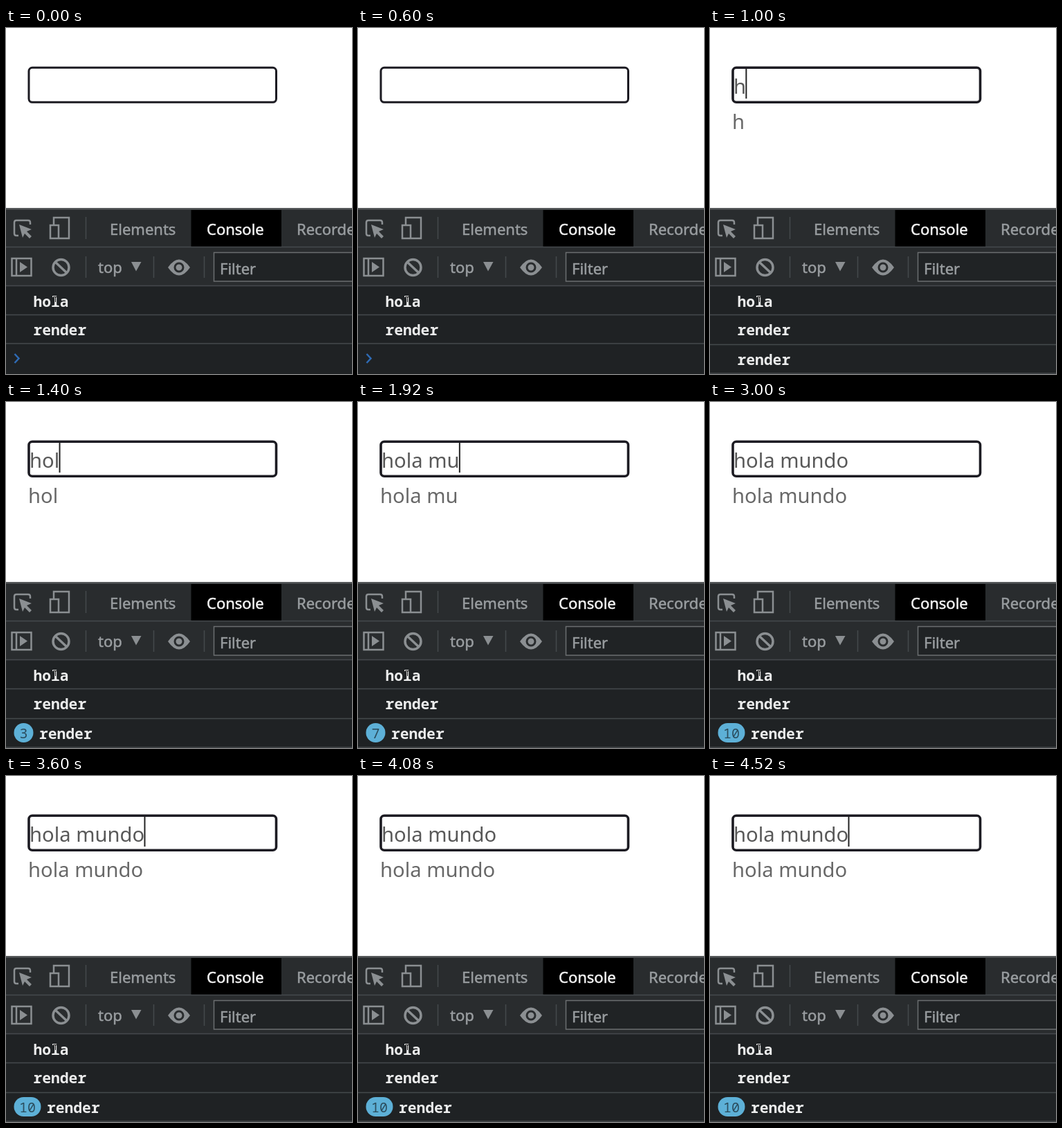
These frames come from a looping animation (500x500 px, 4640 ms). An HTML page:

```html
<!DOCTYPE html>
<html lang="es">
<head>
<meta charset="utf-8">
<style>
  html, body { margin: 0; width: 100%; height: 100%; overflow: hidden; background: #fff; }
  svg { display: block; width: 100%; height: 100%; }
  text { font-family: "Noto Sans", "Open Sans", sans-serif; white-space: pre; }
  text, #field, .icon, .solid { filter: blur(0.5px); }
  .typed { font-size: 29.2px; fill: #585858; }
  .ui { font-size: 22px; fill: #9a9ea1; stroke: #9a9ea1; stroke-width: 0.5; }
  .active { fill: #f4f4f4; stroke: #f4f4f4; }
  .log { font: 600 21.3px "Noto Sans Mono", "DejaVu Sans Mono", monospace; fill: #eceded; }
  .icon { fill: none; stroke: #8b8f92; stroke-width: 2.5; }
  .solid { fill: #8b8f92; }
  .rule { stroke: #45494c; stroke-width: 1.5; }
</style>
</head>
<body>
<svg viewBox="0 0 500 500">
  <rect id="field" x="33" y="57.300" width="357.500" height="50" rx="5" fill="#fff" stroke="#1c1b22"/>
  <text id="value" class="typed" x="34" y="95"/>
  <text id="echo" class="typed" x="32" y="146" style="fill:#686868"/>
  <path id="caret" stroke="#222" stroke-width="2"/>

  <rect y="260" width="500" height="240" fill="#1f2224"/>
  <rect y="260" width="500" height="112" fill="#292c2e"/>
  <rect y="260" width="500" height="2.500" fill="#56595b"/>
  <rect x="267.500" y="263" width="130.500" height="53" fill="#000"/>
  <path class="rule" d="M0 316.500H500M0 372.500H500M0 414.500H500M115.500 273V305M115.500 330V361M213.500 330V361M286.500 330V361"/>

  <text class="ui" x="150" y="299">Elements</text>
  <text class="ui active" x="290" y="299">Console</text>
  <text class="ui" x="420" y="299">Recorder</text>
  <text class="ui" x="133" y="354">top</text>
  <rect x="300.500" y="324.500" width="210" height="41.500" fill="#202325" stroke="#6b6e70" stroke-width="1.500"/>
  <text class="ui" x="309" y="355.500">Filter</text>

  <path class="icon" d="M18 300H15Q12 300 12 297V281Q12 278 15 278H32Q35 278 35 281V284"/>
  <path class="solid" d="M19 284L37 291L30 294L37 301L34 304L27 297L24 303Z"/>
  <path class="icon" d="M69 284V274H91V304H77M64 285H76V304H64Z"/>
  <path class="icon" d="M8.500 333H36.500V358H8.500ZM15 333V358"/>
  <path class="solid" d="M20 338L31 345.500L20 353Z"/>
  <circle class="icon" cx="79.500" cy="346" r="11.500" style="stroke-width:3.500"/>
  <path class="icon" d="M71 338L88 354" style="stroke-width:3.500"/>
  <path class="solid" d="M181 338H195.500L188 351.500Z"/>
  <path class="solid" d="M234 346Q250 323 266 346Q250 369 234 346Z"/>
  <circle cx="250" cy="346" r="6" fill="#8b8f92" stroke="#292c2e" stroke-width="3"/>

  <text class="log" x="39.500" y="403">hola</text>
  <path d="M68 388.500H74M71.500 388V396" stroke="#111" fill="none"/>
  <text class="log" x="39.500" y="444">render</text>
  <path id="split" class="rule"/>
  <path id="prompt" d="M12.500 471L18.500 477.500L12.500 484" fill="none" stroke="#2f6bb5" stroke-width="2.500"/>
  <g id="newLog">
    <path class="rule" d="M0 499H500"/>
    <rect id="badge" x="11.500" y="464" height="28" rx="14" fill="#5db0d7"/>
    <text id="count" class="log" y="485.500" text-anchor="middle" style="fill:#2b4d5e;font-size:20px;font-weight:500"/>
    <text id="label" class="log" y="487">render</text>
  </g>
</svg>
<script>
  const LOOP = 4640, BLINK = 530;
  const phrase = "hola mundo";
  const keyTimes = [800, 1040, 1300, 1440, 1580, 1740, 1900, 2060, 2220, 2360];
  const $ = id => document.getElementById(id);
  const set = (id, attrs) => {
    for (const name in attrs) $(id).setAttribute(name, attrs[name]);
  };

  function draw(t) {
    const n = keyTimes.filter(key => key <= t).length;
    $("value").textContent = $("echo").textContent = phrase.slice(0, n);
    set("field", { "stroke-width": n ? 3.6 : 3 });

    // Each key press restarts the caret's blink.
    const caretOn = n && Math.floor((t - keyTimes[n - 1]) / BLINK) % 2 === 0;
    const end = n ? 34 + $("value").getComputedTextLength() : 34;
    set("caret", { d: `M${end + 0.3} 59V102`, visibility: caretOn ? "visible" : "hidden" });

    const pill = n > 9 ? 39 : 28;
    const repeated = n > 1 ? "inherit" : "hidden";
    set("prompt", { visibility: n ? "hidden" : "visible" });
    set("newLog", { visibility: n ? "visible" : "hidden" });
    set("badge", { width: pill, visibility: repeated });
    set("count", { x: 11.5 + pill / 2, visibility: repeated });
    set("label", { x: n > 1 ? 20 + pill : 39.5 });
    set("split", { d: `M0 ${n ? 457.5 : 456}H500` });
    $("count").textContent = n;
  }

  const start = performance.now();
  function tick() {
    draw((performance.now() - start) % LOOP);
    requestAnimationFrame(tick);
  }
  tick();
</script>
</body>
</html>
```
